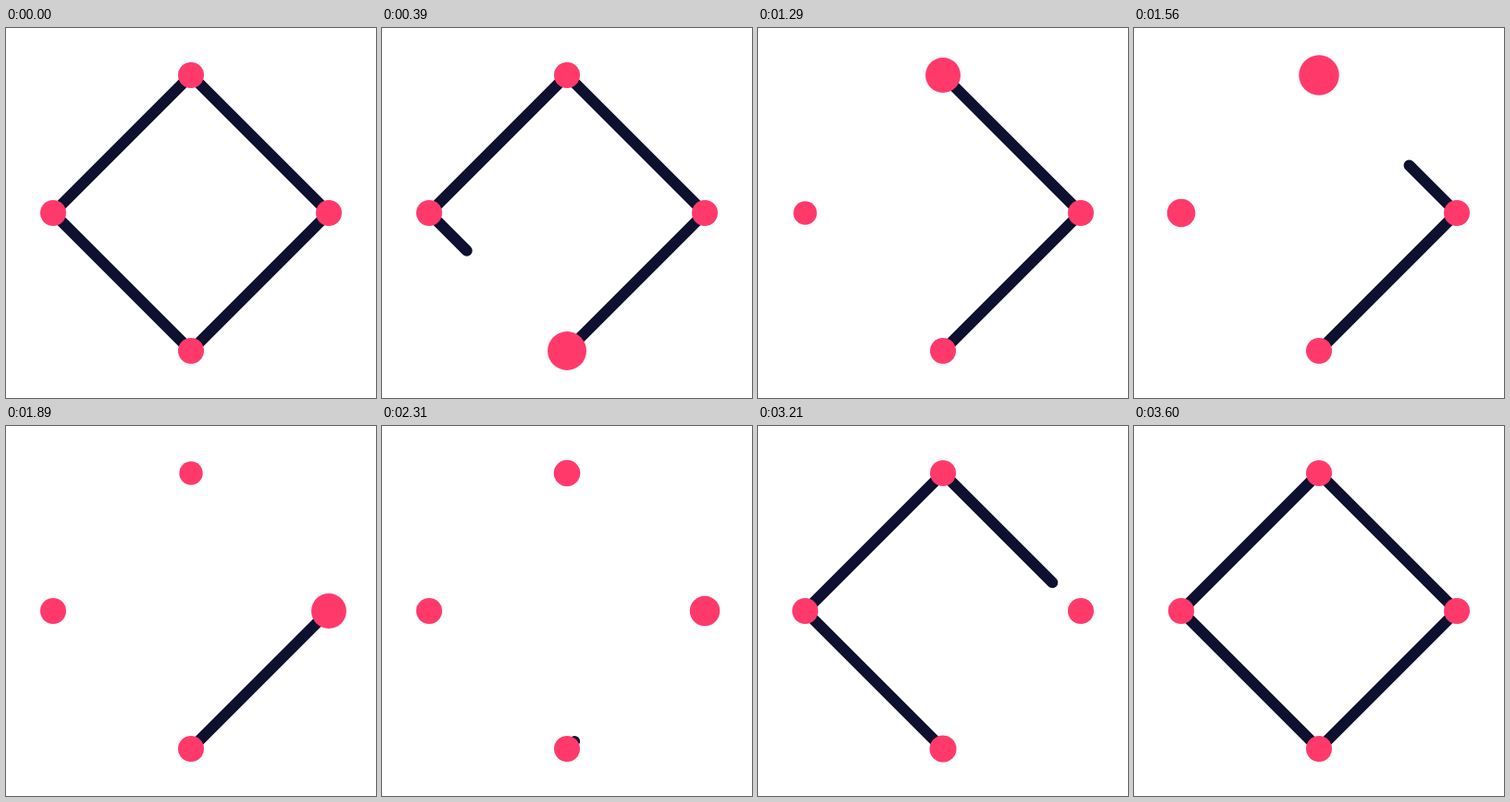
Write an HTML page with a canvas that moves like this. It is 400 px wide and 400 px high and loops after 3.63 s.

```html
<!DOCTYPE html>
<html lang="en">
<head>
<meta charset="utf-8">
<title>Diamond loop</title>
<style>
  html, body { margin: 0; width: 100%; height: 100%; overflow: hidden; background: #fff; }
  canvas { display: block; width: 400px; height: 400px; }
</style>
</head>
<body>
<canvas id="stage" width="400" height="400"></canvas>
<script>
const ctx = document.getElementById('stage').getContext('2d');

const LOOP = 3630, STEP = 30;
const ERASE_EDGE = 600, DRAW_EDGE = 300, DRAW_START = 4 * ERASE_EDGE;
const DOT_RADIUS = 14, LINE_WIDTH = 12;
const PINK = '#ff3a6b', NAVY = '#0e1030';

// Clockwise from the bottom; the path closes on its first corner.
const corners = [[200, 349], [51, 200], [200, 51], [349, 200], [200, 349]];

// Dot scale over the time since the line end left the corner.
const bounce = [[0, 1], [300, 1.6], [660, 0.9], [900, 1.1], [1200, 1]];

const mix = (a, b, p) => a + (b - a) * p;
const easeInOut = p => (1 - Math.cos(Math.PI * p)) / 2;
const easeOut = p => 1 - Math.pow(1 - p, 2.5);

function dotScale(age) {
  if (age <= 0 || age >= 1200) return 1;
  const i = bounce.findIndex(key => key[0] > age);
  const [t0, s0] = bounce[i - 1], [t1, s1] = bounce[i];
  const ease = i === 1 ? easeOut : easeInOut;
  return mix(s0, s1, ease((age - t0) / (t1 - t0)));
}

// Number of edges travelled, easing along each edge in turn.
function travel(time, edgeTime) {
  const edges = Math.min(4, time / edgeTime);
  const whole = Math.floor(edges);
  return whole + easeInOut(edges - whole);
}

function pointAt(position) {
  const i = Math.min(3, Math.floor(position));
  const [x0, y0] = corners[i], [x1, y1] = corners[i + 1];
  return [mix(x0, x1, position - i), mix(y0, y1, position - i)];
}

function drawLine(from, to) {
  if (to - from < 1e-6) return;
  ctx.beginPath();
  ctx.moveTo(...pointAt(from));
  for (let i = Math.floor(from) + 1; i < to; i++) ctx.lineTo(...corners[i]);
  ctx.lineTo(...pointAt(to));
  ctx.stroke();
}

function drawDot([x, y], scale) {
  ctx.beginPath();
  ctx.arc(x, y, DOT_RADIUS * scale, 0, 2 * Math.PI);
  ctx.fill();
}

function render(t) {
  ctx.fillStyle = '#fff';
  ctx.fillRect(0, 0, 400, 400);

  ctx.strokeStyle = NAVY;
  ctx.lineWidth = LINE_WIDTH;
  ctx.lineCap = ctx.lineJoin = 'round';
  if (t < DRAW_START) drawLine(travel(t, ERASE_EDGE), 4);
  else drawLine(0, travel(t - DRAW_START, DRAW_EDGE));

  ctx.fillStyle = PINK;
  for (let i = 0; i < 4; i++) {
    const start = i === 0 && t >= DRAW_START ? DRAW_START : i * ERASE_EDGE;
    drawDot(corners[i], dotScale(t - start));
  }
}

const begin = performance.now();

function tick() {
  const t = (performance.now() - begin) % LOOP;
  render(Math.floor(t / STEP) * STEP);
  requestAnimationFrame(tick);
}
tick();
</script>
</body>
</html>
```
